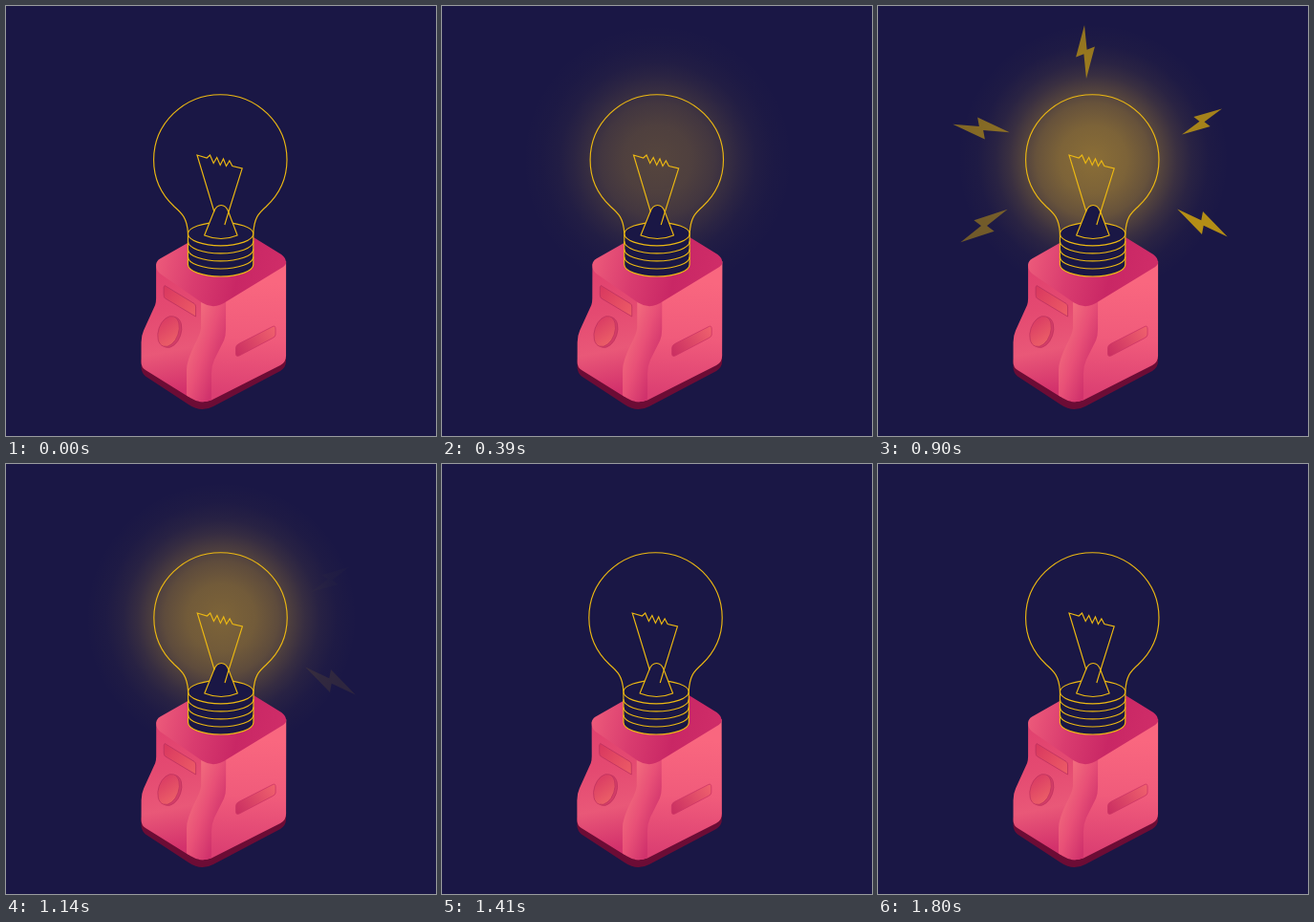
Animation of 450 by 450 pixels, one loop 1.83 s. Source, as an HTML page with a canvas:

```html
<!DOCTYPE html>
<html lang="en">
<head>
<meta charset="utf-8">
<title>Light bulb</title>
<style>
html, body { margin: 0; width: 100%; height: 100%; overflow: hidden; background: #1a1745; }
canvas { display: block; width: 450px; height: 450px; }
</style>
</head>
<body>
<canvas id="stage" width="450" height="450"></canvas>
<script>
const ctx = document.getElementById('stage').getContext('2d');
const LOOP = 1830, NAVY = '#1a1745', GOLD = '#fac400', WIRE = '#ecb812';
const clamp = v => Math.max(0, Math.min(1, v));
const ramp = (t, a, b) => clamp((t - a) / (b - a));
const mix = (a, b, p) => a + (b - a) * p;

// from, to (centres), angle in degrees, half length
const bolts = [
  { from: [145, 210], to: [111, 230], angle: -35, size: 30 },
  { from: [144, 138], to: [108, 128], angle: 8, size: 30 },
  { from: [220, 80], to: [217, 48], angle: 88, size: 28 },
  { from: [309, 137], to: [339, 121], angle: -33, size: 25 },
  { from: [306, 207], to: [339.5, 227], angle: 29, size: 30 }
];

function linear(x0, y0, x1, y1, ...colors) {
  const g = ctx.createLinearGradient(x0, y0, x1, y1);
  colors.forEach((c, i) => g.addColorStop(i / (colors.length - 1), c));
  return g;
}

function shape(d, fill, stroke, width = 1) {
  const p = new Path2D(d);
  if (fill) { ctx.fillStyle = fill; ctx.fill(p); }
  if (stroke) { ctx.strokeStyle = stroke; ctx.lineWidth = width; ctx.stroke(p); }
}

function drawGlow(power) {
  if (power <= 0) return;
  const g = ctx.createRadialGradient(225, 161, 0, 225, 161, 142);
  [[0, .5], [.25, .44], [.42, .34], [.52, .24], [.62, .14], [.72, .07], [.85, .02], [1, 0]]
    .forEach(([at, a]) => g.addColorStop(at, `rgba(250,196,40,${a * power})`));
  ctx.fillStyle = g;
  ctx.fillRect(80, 15, 290, 290);
}

function drawBox() {
  // base plate
  shape('M141.5 370 V379 Q142 384 146 387.5 L191 417 Q204 426 217 419 L287 382 Q293 378 293 372 V364 Z', '#6c0c35');
  // right face
  shape('M215 306 L293 267 V366 Q293 373 287 376 L215 412.5 Q208 415 202 414 Z',
    linear(252, 288, 245, 408, '#f9677f', '#f05b7b', '#db3f72'));
  // left face
  shape('M157 270 L210 309 L206 340 L191 378 V409 L146 381 Q141.5 378 141.5 373 V352 Q141.5 345 144 339.5 L156 313 Q157 310 157 306 Z',
    linear(158, 278, 182, 402, '#e1426f', '#e44a71', '#e95878', '#d3326c'));
  // front edge
  shape('M204 308 V337 Q203 344 198 353 Q189 371 189 381 V407.5 Q203 418 215 412 V384 Q215 377 218 370 L228 350 Q230 345 230 338 V306 Z',
    linear(190, 350, 229, 364, '#f26c7d', '#e85077', '#d0326c'));
  // top face
  shape('M161 264.5 L212 235.5 Q225 228 237 229 L260 242.7 L288 260 Q293 263.5 293 269 Q292.5 271.5 290 273 L231 309 Q218 318.5 205 310.5 L161 280 Q157 277 157 271 Q157 267 161 264.5 Z',
    linear(158, 262, 286, 290, '#ec5a7a', '#d93c6f', '#c92765', '#cf2d68'));
  // slots
  shape('M166 292.5 L197 311.5 Q198.5 312.5 198.5 315 V325 L166.5 306 Q165 305 165 302 V294 Z',
    linear(165, 295, 198, 322, '#d9385f', '#ec5b66'), '#bd315f', .8);
  shape('M240.5 358 Q240.5 355 243.5 353.5 L279 335.5 Q282 334 282 338 V344 Q282 346 279 347.5 L244 366 Q240.5 367.5 240.5 364 Z',
    linear(243, 365, 281, 337, '#cb3062', '#ef616d'), '#cc3565', .8);
  // button
  const oval = (x, y, fill) => {
    ctx.beginPath();
    ctx.ellipse(x, y, 10.5, 16.5, .33, 0, 7);
    ctx.fillStyle = fill;
    ctx.fill();
    ctx.strokeStyle = '#bf335f';
    ctx.lineWidth = .8;
    ctx.stroke();
  };
  oval(172.5, 341.5, '#d33d68');
  oval(170, 340.5, linear(162, 328, 180, 354, '#d93a63', '#ee6468'));
}

function drawBulb() {
  const line = 1.15, side = 238.3, gap = 8.05;
  ctx.lineJoin = 'round';
  shape(`M190.3 ${side} A34.2 11.7 0 0 1 258.7 ${side} V${side + 4 * gap} A34.2 12.5 0 0 1 190.3 ${side + 4 * gap} Z`,
    NAVY, WIRE, line);
  for (let i = 0; i < 4; i++) {
    const y = side + i * gap;
    shape(`M190.3 ${y} A34.2 12.5 0 0 0 258.7 ${y}`, null, WIRE, line);
  }
  shape('M190.3 238 C189.5 222 184 217 176 210 C162 197 154.4 180 154.4 161 A69.7 68.3 0 0 1 293.8 161' +
    ' C293.8 180 286 197 272 210 C264 217 259.5 222 258.7 238', null, WIRE, line);
  shape('M207.5 240 L217.5 215 Q220 208.5 225 208.5 Q230 208.5 232.5 215 L242 240 Q225 247 207.5 240 Z', NAVY, WIRE, line);
  ctx.lineJoin = 'miter';
  shape('M217.8 215.5 L199.8 156 L210 159 L213.3 156 L217 164.5 L220.5 158.5 L224 166.5 L227.3 160' +
    ' L230.3 167.5 L233.7 162 L236.7 167.5 L247 170 L232.3 217 L228.7 229', null, WIRE, line);
}

function drawBolt(b, i, t) {
  const start = 545 + [0, 20, 50, 80, 110][i], end = 1055 + 30 * i;
  const grow = ramp(t, start, start + 170);
  const alpha = 1 - ramp(t, end - 400, end);
  if (!grow || !alpha) return;
  ctx.save();
  ctx.globalAlpha = alpha;
  ctx.translate(mix(b.from[0], b.to[0], grow), mix(b.from[1], b.to[1], grow));
  ctx.rotate(b.angle * Math.PI / 180);
  ctx.scale(b.size * grow, b.size * grow);
  shape('M1 0 L-.18 -.36 L-.08 -.06 L-1 0 L.18 .36 L.08 .06 Z', GOLD);
  ctx.restore();
}

function draw(t) {
  ctx.setTransform(1, 0, 0, 1, 0, 0);
  ctx.fillStyle = NAVY;
  ctx.fillRect(0, 0, 450, 450);
  const power = ramp(t, 260, 505) * (1 - ramp(t, 1110, 1380));
  // sway: the foot stays put, the top moves about a pixel
  const k = (Math.sin(t / 180 * Math.PI * 2 + .35) - .1) / 327;
  ctx.save();
  ctx.transform(1, 0, -k, 1, k * 420, 0);
  drawGlow(power);
  drawBox();
  drawBulb();
  ctx.restore();
  bolts.forEach((b, i) => drawBolt(b, i, t));
}

const begin = performance.now();
function tick() {
  const t = (performance.now() - begin) % LOOP;
  draw(Math.floor(t / 30) * 30);
  requestAnimationFrame(tick);
}
tick();
</script>
</body>
</html>
```
